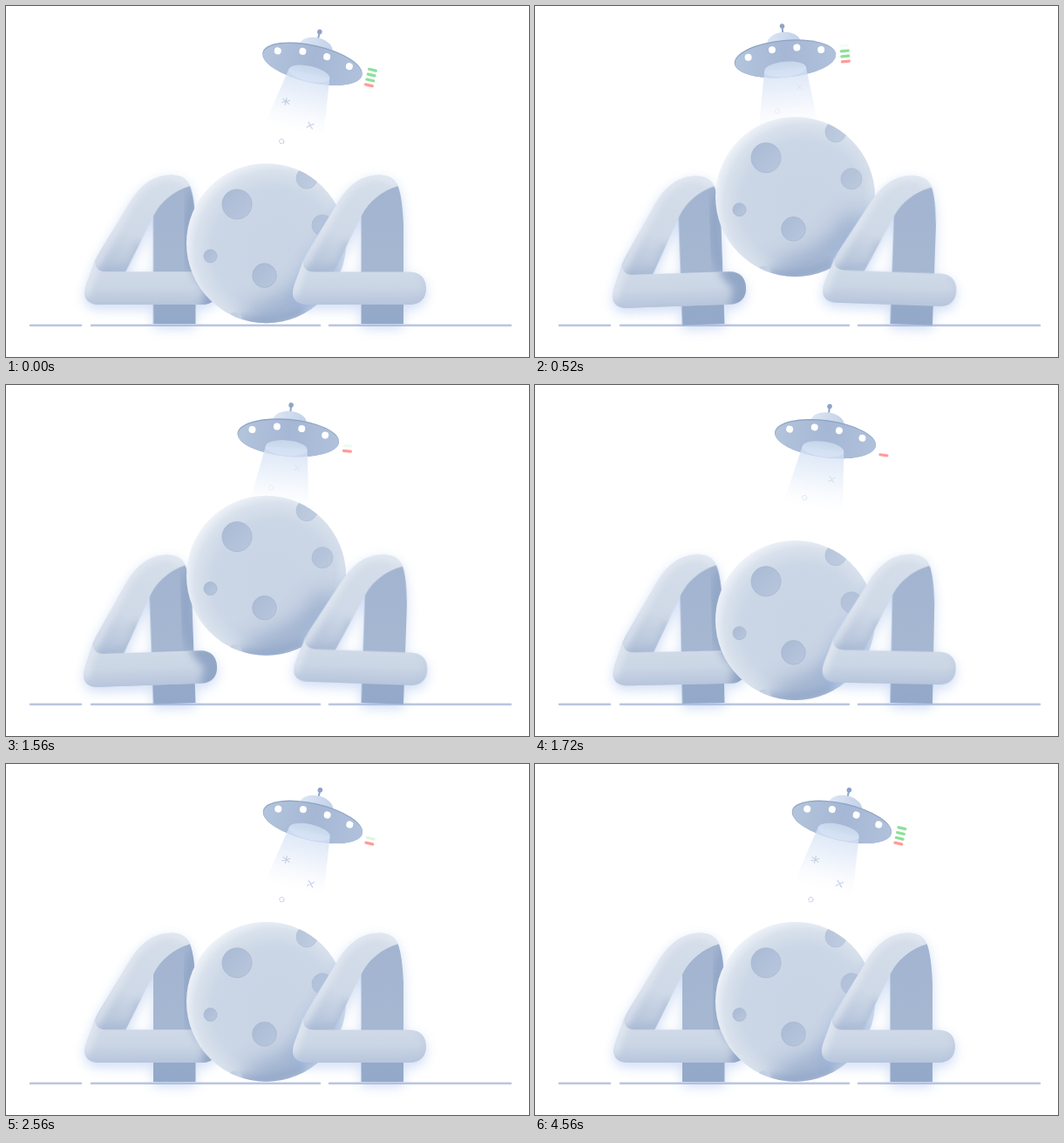
Animation, 600 px wide and 402 px high, one loop 4640 ms. Source, as an HTML page:

```html
<!DOCTYPE html>
<html lang="en">
<head>
<meta charset="utf-8">
<title>404</title>
<style>
  html, body { margin: 0; width: 100%; height: 100%; overflow: hidden; background: #fff; }
  svg { display: block; width: 100%; height: 100%; }
  .four { filter: drop-shadow(0 5px 7px rgba(150, 180, 232, .46)); }
  .mark { fill: none; stroke: #c3cfe4; stroke-width: 1.1; stroke-linecap: round; }
</style>
</head>
<body>
<svg viewBox="0 0 600 402">
  <defs>
    <filter id="blur4" x="-60%" y="-60%" width="220%" height="220%"><feGaussianBlur stdDeviation="4"/></filter>
    <filter id="blur13" x="-60%" y="-100%" width="220%" height="300%"><feGaussianBlur stdDeviation="13"/></filter>

    <radialGradient id="moonFill" cx=".55" cy=".54" r=".56">
      <stop offset="0" stop-color="#c8d3e4"/>
      <stop offset=".68" stop-color="#cbd6e6"/>
      <stop offset=".88" stop-color="#d8e1ec"/>
      <stop offset="1" stop-color="#eef2f8"/>
    </radialGradient>
    <linearGradient id="crater" x1="0" y1="0" x2="1" y2="1">
      <stop offset="0" stop-color="#a9bad4"/>
      <stop offset="1" stop-color="#b9c7dd"/>
    </linearGradient>
    <clipPath id="moonClip"><circle r="91.5"/></clipPath>

    <linearGradient id="leg" x1="0" y1="0" x2="0" y2="1">
      <stop offset="0" stop-color="#a2b4d0"/>
      <stop offset=".6" stop-color="#a6b7d1"/>
      <stop offset=".85" stop-color="#95a9c8"/>
      <stop offset="1" stop-color="#94a9ca"/>
    </linearGradient>
    <linearGradient id="slope" gradientUnits="userSpaceOnUse" x1="425" y1="195" x2="355" y2="306">
      <stop offset="0" stop-color="#d5deea"/>
      <stop offset=".6" stop-color="#cfd9e7"/>
      <stop offset="1" stop-color="#b2c1d9"/>
    </linearGradient>
    <linearGradient id="bar" x1="0" y1="0" x2="0" y2="1">
      <stop offset="0" stop-color="#d3dce9"/>
      <stop offset=".6" stop-color="#cbd6e5"/>
      <stop offset="1" stop-color="#b7c5dc"/>
    </linearGradient>
    <clipPath id="legClip"><use href="#legShape"/></clipPath>
    <clipPath id="slopeClip"><use href="#slopeShape"/></clipPath>
    <clipPath id="barClip"><use href="#barShape"/></clipPath>

    <linearGradient id="disc" x1="0" y1="0" x2="1" y2="0">
      <stop offset="0" stop-color="#b3c4dc"/>
      <stop offset=".5" stop-color="#a5b7d4"/>
      <stop offset="1" stop-color="#b0c1dc"/>
    </linearGradient>
    <linearGradient id="dome" x1="0" y1="0" x2="1" y2="0">
      <stop offset="0" stop-color="#dce6f4"/>
      <stop offset="1" stop-color="#c2d1e8"/>
    </linearGradient>
    <linearGradient id="hole" x1="0" y1="0" x2="0" y2="1">
      <stop offset="0" stop-color="#c6d5ea"/>
      <stop offset="1" stop-color="#d9e5f5"/>
    </linearGradient>
    <linearGradient id="beam" x1="0" y1="0" x2="0" y2="1">
      <stop offset="0" stop-color="#d3e0f4" stop-opacity=".85"/>
      <stop offset=".5" stop-color="#e0e9f8" stop-opacity=".5"/>
      <stop offset="1" stop-color="#ecf2fb" stop-opacity="0"/>
    </linearGradient>

    <path id="legShape" d="M407.500 364 V240 C416 223 432 211 449.500 206 C453 214 455 230 456 250 V364 Z"/>
    <path id="slopeShape" d="M340 303 C339 296 341 291 344 285 L380 226 C393 205 408 193 430 193.500 C440 194 447 199 449.500 206 C430 212 416 225 409 238 L375 306 L345 309 Z"/>
    <path id="barShape" d="M341 290 C340 301 345 304.500 354 304.500 H463 C476 304.500 482 313 482 323.500 C482 335 475 342 463 342 H346 C334 342 328 336 329 327 C330 318 336 308 341 290 Z"/>

    <g id="fourShape">
      <use href="#legShape" fill="url(#leg)"/>
      <use href="#slopeShape" fill="url(#slope)"/>
      <g clip-path="url(#slopeClip)">
        <path d="M338 301 L380 226 C393 205 408 193 430 193.500 L450 203" fill="none" stroke="#e9eef5" stroke-width="9" opacity=".75" filter="url(#blur4)"/>
        <path d="M346 307 L382 300 L393 270" fill="none" stroke="#9fb1ce" stroke-width="9" opacity=".55" filter="url(#blur4)"/>
      </g>
      <use href="#barShape" fill="url(#bar)"/>
      <g clip-path="url(#barClip)">
        <path d="M341 292 C338 312 328 320 330 333" fill="none" stroke="#eaeff6" stroke-width="9" opacity=".7" filter="url(#blur4)"/>
        <path d="M476 302 C488 314 486 334 474 344" fill="none" stroke="#b2c1da" stroke-width="6" opacity=".6" filter="url(#blur4)"/>
      </g>
    </g>
  </defs>

  <path d="M28 365.800H86M98 365.800H360M371 365.800H579" stroke="#bac6e0" stroke-width="2.600" stroke-linecap="round"/>

  <g id="ufo">
    <path d="M0 -30V-37" stroke="#8fa3c6" stroke-width="2"/>
    <circle cy="-37.500" r="2.800" fill="#8fa3c6"/>
    <ellipse cy="-18" rx="19.500" ry="12.500" fill="url(#dome)"/>
    <ellipse rx="58.500" ry="21.500" fill="#90a5c6"/>
    <ellipse cx=".3" cy=".6" rx="58" ry="20.700" fill="url(#disc)"/>
    <g fill="#fff">
      <circle cx="-42" cy="-5.500" r="4"/><circle cx="-14" cy="-11.500" r="4"/>
      <circle cx="14.500" cy="-11.500" r="4"/><circle cx="42" cy="-6.500" r="4"/>
    </g>
    <ellipse cx="-1" cy="12" rx="24" ry="8.800" fill="url(#hole)"/>
    <path d="M-25 12 L-38 80 H31 L23 12 Z" fill="url(#beam)"/>
    <g id="marks" class="mark">
      <path id="mark0" d="M-20 45V53M-24 47L-16 51M-16 47L-24 51"/>
      <path d="M10.500 66.500L16.500 73M17 67L10 72.500"/>
      <circle cx="-14.600" cy="94.700" r="2.600" stroke-dasharray="2 1.500"/>
    </g>
    <g id="cells" stroke-width="3.200" stroke-linecap="round" stroke="#8ce09a">
      <path d="M64.800 -8.500H72.800"/><path d="M64.800 -2.500H72.800"/><path d="M64.800 3.500H72.800"/>
      <path d="M64.800 9.500H72.800" stroke="#ff9b99"/>
    </g>
  </g>

  <g id="left">
    <g transform="translate(-238.500 0)">
      <use class="four" href="#fourShape"/>
      <g clip-path="url(#legClip)">
        <path d="M458 212 C446 235 446 275 456 304" fill="none" stroke="#869cc0" stroke-width="14" opacity=".6" filter="url(#blur4)"/>
      </g>
      <use href="#barShape" fill="url(#bar)"/>
      <g clip-path="url(#barClip)">
        <path d="M341 292 C338 312 328 320 330 333" fill="none" stroke="#eaeff6" stroke-width="9" opacity=".7" filter="url(#blur4)"/>
        <path d="M450 300 Q456 314 467 324 L462 348 H490 V300 Z" fill="#8ca1c3" opacity=".9" filter="url(#blur4)"/>
      </g>
    </g>
  </g>

  <g id="moon">
    <circle r="91.500" fill="url(#moonFill)"/>
    <g clip-path="url(#moonClip)">
      <path d="M72 22 Q52 72 -22 88" fill="none" stroke="#839bc1" stroke-width="24" opacity=".78" filter="url(#blur13)"/>
      <path d="M-30 88 Q10 95 44 76" fill="none" stroke="#8299c0" stroke-width="11" opacity=".6" filter="url(#blur4)"/>
      <path d="M88 -22 Q96 18 74 56" fill="none" stroke="#dce5f0" stroke-width="8" opacity=".6" filter="url(#blur4)"/>
      <g fill="url(#crater)" stroke="#a6b7d2" stroke-width=".8">
        <circle cx="-33.500" cy="-44.600" r="17"/>
        <circle cx="46.500" cy="-74.500" r="12" opacity=".75"/>
        <circle cx="64.500" cy="-20.500" r="12" opacity=".8"/>
        <circle cx="-64" cy="14.800" r="7.500"/>
        <circle cx="-2" cy="37" r="13.800"/>
      </g>
      <circle cx="-36" cy="87" r="8" fill="#c3cfe2"/>
    </g>
  </g>

  <g id="right"><use class="four" href="#fourShape"/></g>
</svg>

<script>
  const LOOP = 4640, DROP = 1670;
  const get = id => document.getElementById(id);
  const set = (el, name, value) => el.setAttribute(name, value);
  const part = (t, start, length) => Math.min(1, Math.max(0, (t - start) / length));
  const mix = (a, b, p) => a + (b - a) * p;
  const quart = p => 1 - (1 - p) ** 4;
  const elastic = p => p <= 0 ? 0 : p >= 1 ? 1
    : 1 + 2 ** (-10 * p) * Math.sin((p - 0.075) * 2 * Math.PI / 0.3);

  const ufo = get('ufo'), marks = get('marks'), mark0 = get('mark0');
  const cells = [...get('cells').children];
  const drain = [120, 640, 1180], refill = [4000, 3280, 2520];

  function tiltAt(t) {
    if (t < 600) return mix(13, -5.3, quart(part(t, 0, 560)));
    if (t < DROP) return mix(-5.3, 5.2, Math.sin(part(t, 600, DROP - 600) * Math.PI / 2));
    return mix(5.2, 13, quart(part(t, DROP, 560)));
  }

  function draw(t) {
    const tilt = tiltAt(t);
    set(ufo, 'transform',
      `translate(${305.8 + 3.55 * tilt} ${59.2 + 0.042 * tilt * tilt}) rotate(${tilt})`);

    // Floating bits are pulled up the beam and fade as they rise.
    const pull = quart(part(t, 0, 560)) - quart(part(t, DROP, 560));
    set(marks, 'transform', `translate(0 ${-36 * pull})`);
    set(marks, 'opacity', 1 - 0.75 * pull);
    set(mark0, 'opacity', Math.max(0, 1 - 1.6 * pull));

    const lift = elastic(part(t, 0, 600)) - elastic(part(t, DROP, 720));
    set(get('moon'), 'transform', `translate(298.500 ${272.3 - 54 * lift})`);

    const lean = 2 * ((1 - (1 - part(t, 0, 240)) ** 3) - (1 - (1 - part(t, DROP, 210)) ** 2));
    set(get('left'), 'transform', `rotate(${-lean} 217 365)`);
    set(get('right'), 'transform', `rotate(${lean} 408 364)`);

    drain.forEach((start, i) => {
      const level = 1 - part(t, start, 440) + quart(part(t, refill[i], 520));
      set(cells[i], 'opacity', level);
    });
  }

  const began = performance.now();
  function tick() {
    draw((performance.now() - began) % LOOP);
    requestAnimationFrame(tick);
  }
  draw(0);
  requestAnimationFrame(tick);
</script>
</body>
</html>
```
